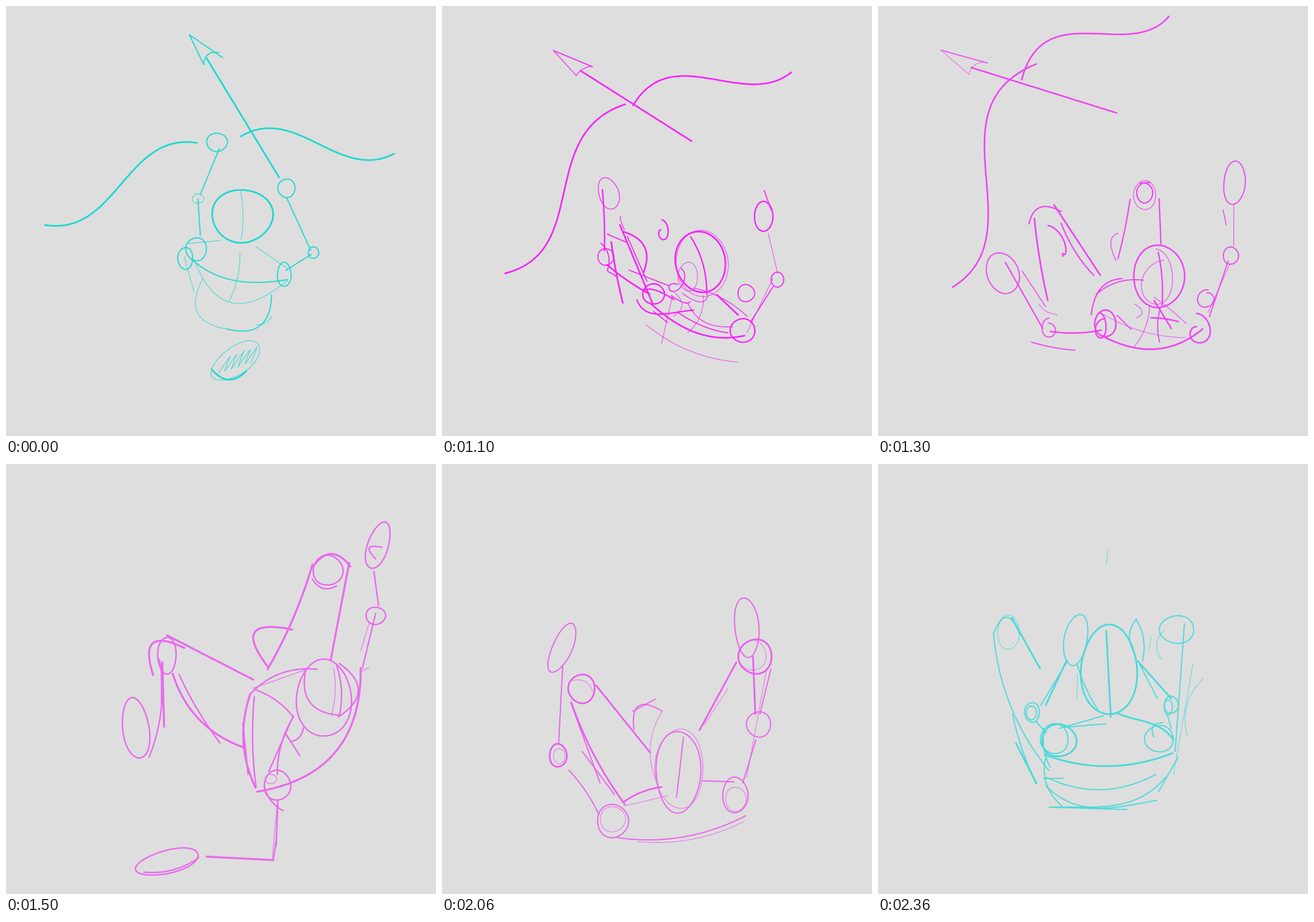
An HTML page for the animation above (2.86 s loop, 748 by 748 pixels).

```html
<!DOCTYPE html>
<html lang="en">
<head>
<meta charset="utf-8">
<title>Jump roughs</title>
<style>
html, body { margin: 0; width: 100%; height: 100%; overflow: hidden; background: #dedede; }
svg { display: block; width: 100vw; height: 100vh; }
path { fill: none; stroke-linecap: round; stroke-linejoin: round; }
</style>
</head>
<body>
<svg id="stage" viewBox="0 0 748 748"></svg>
<script>
const N = 48;
const mix = (a, b, t) => a + (b - a) * t;
const trace = f => ({ w: 1, pts: Array.from({ length: N + 1 }, (_, i) => f(i / N)) });

// Bowed line: p and q push its two handles to the right of the way it runs.
function arc(x1, y1, x2, y2, p = 0, q = p) {
  const dx = x2 - x1, dy = y2 - y1, len = Math.hypot(dx, dy);
  return trace(t => {
    const off = 3 * t * (1 - t) * ((1 - t) * p + t * q);
    return [x1 + dx * t - dy / len * off, y1 + dy * t + dx / len * off];
  });
}

function ring(cx, cy, rx, ry, tilt = 0) {
  const r = tilt * Math.PI / 180, c = Math.cos(r), s = Math.sin(r);
  return trace(t => {
    const a = (t - .25) * 2 * Math.PI, k = 1 + .025 * Math.sin(3 * a + cx);
    const x = rx * k * Math.cos(a), y = ry * k * Math.sin(a);
    return [cx + x * c - y * s, cy + x * s + y * c];
  });
}

function hatch(x1, y1, x2, y2, turns, h) {
  return trace(t => {
    const s = Math.asin(Math.cos(t * turns * 2 * Math.PI)) / Math.PI * 2 * h;
    return [mix(x1, x2, t) - s * .55, mix(y1, y2, t) + s];
  });
}

const fine = s => ({ ...s, w: .62 });
const bold = s => ({ ...s, w: 1.4 });
const groups = ["guide", "legL", "legR", "body", "armL", "armR", "head"];

class Pose {
  constructor(ink, weight) {
    this.ink = [1, 3, 5].map(i => parseInt(ink.slice(i, i + 2), 16));
    this.weight = weight;
    for (const g of groups) this[g] = [];
  }
  part(name, ...strokes) {
    this[name] = strokes.map(s => ({ ...s, w: s.w * this.weight }));
    return this;
  }
}

const stand = new Pose("#1ed8d0", 2.1)
  .part("guide", bold(arc(68, 381, 332, 238, 77, -76)), bold(arc(408, 227, 675, 257, -68, 60)),
    bold(arc(475, 298, 349, 91)), arc(377, 90, 319, 50), arc(319, 50, 344, 102), arc(344, 102, 370, 81, -12))
  .part("head", bold(ring(411, 365, 53, 46)), fine(arc(408, 322, 409, 406, -5)))
  .part("body", arc(322, 440, 490, 476, 33, 22), fine(arc(328, 443, 490, 477, 85, 70)),
    fine(arc(407, 430, 388, 514, -7)), fine(arc(342, 475, 385, 562, 45)), arc(385, 562, 462, 503, 40),
    fine(arc(436, 555, 463, 540, 5)), fine(arc(318, 413, 372, 408)), fine(arc(435, 419, 490, 457)))
  .part("armL", ring(367, 237, 18, 16), arc(371, 248, 338, 328), fine(ring(334, 335, 10, 8)),
    arc(334, 336, 338, 399), ring(331, 423, 18, 20))
  .part("armR", ring(488, 317, 15, 16), arc(488, 333, 530, 425), ring(535, 429, 9, 10),
    arc(531, 432, 487, 460), ring(484, 467, 12, 21))
  .part("legL", ring(312, 439, 13, 19), fine(arc(310, 436, 327, 497)))
  .part("legR", fine(ring(400, 617, 49, 24, -35)), bold(arc(358, 632, 418, 635, 22)),
    fine(hatch(376, 626, 435, 605, 5, 16)));

const dip = new Pose("#fb10fb", 2.1)
  .part("guide", bold(arc(90, 441, 362, 241, 103, -52)), bold(arc(415, 218, 709, 213, -80, 50)),
    bold(arc(453, 284, 320, 118)), arc(333, 112, 278, 78), arc(278, 78, 309, 123), arc(309, 123, 333, 112))
  .part("head", bold(ring(432, 399, 45, 58, -20)), arc(405, 350, 451, 453, -17),
    fine(ring(435, 397, 50, 61, -10)), fine(ring(426, 388, 38, 46)))
  .part("body", bold(arc(355, 463, 505, 516, 12, 32)), bold(arc(354, 462, 382, 522, 8)),
    fine(arc(446, 457, 415, 523, -11)), bold(arc(313, 488, 440, 541, 82, 30)),
    fine(arc(330, 528, 443, 540, 20)), arc(378, 436, 514, 490, -20), fine(arc(367, 478, 515, 516, 50, 30)))
  .part("armL", fine(ring(384, 263, 17, 15)), bold(arc(379, 272, 338, 333, -5)), ring(330, 348, 12, 10),
    bold(arc(331, 367, 362, 445)), ring(366, 452, 21, 13), ring(373, 453, 13, 13),
    arc(373, 241, 402, 219, -14), arc(402, 219, 398, 254, -14))
  .part("armR", bold(ring(508, 369, 13, 15)), fine(arc(523, 391, 559, 456)), ring(563, 461, 10, 11),
    arc(553, 473, 511, 498), ring(500, 505, 20, 15), ring(510, 369, 9, 10))
  .part("legL", arc(314, 411, 320, 452, 30), bold(arc(317, 443, 327, 503)))
  .part("legR", arc(402, 562, 390, 618, 18), arc(390, 618, 458, 562, 22), fine(arc(384, 610, 458, 565, 42)));

const tip = new Pose("#f03cf2", 2)
  .part("guide", bold(arc(130, 489, 275, 101, 107, -150)), bold(arc(250, 128, 506, 18, -120, 47)),
    bold(arc(415, 186, 162, 107)), arc(190, 99, 110, 77), fine(arc(110, 77, 158, 119)), fine(arc(158, 119, 188, 98, -10)))
  .part("head", bold(ring(467, 491, 43, 50)), bold(arc(460, 453, 470, 549, -4)), fine(ring(470, 499, 41, 55)))
  .part("body", bold(arc(374, 575, 547, 631, 36)), arc(350, 528, 424, 499, -28), fine(arc(463, 550, 440, 614, -12)),
    arc(365, 535, 435, 517, -10), bold(arc(488, 536, 552, 597, -4)), fine(arc(497, 545, 548, 590)),
    arc(488, 555, 496, 600, 4), arc(393, 562, 417, 581), fine(arc(430, 530, 428, 570, -18)),
    fine(arc(380, 585, 540, 650, 18)), bold(arc(503, 533, 540, 568)))
  .part("armL", ring(196, 389, 18, 42, -20), arc(179, 367, 227, 518), ring(240, 525, 16, 19),
    bold(arc(243, 533, 360, 557, 7)), bold(ring(370, 550, 17, 22)), arc(180, 385, 231, 500),
    fine(arc(262, 538, 220, 512)), bold(ring(363, 550, 15, 25)), arc(276, 543, 345, 570))
  .part("armR", ring(611, 363, 19, 37), fine(arc(612, 400, 609, 475)), ring(604, 491, 12, 15),
    arc(598, 505, 562, 602), bold(ring(546, 624, 23, 26)), ring(548, 630, 20, 20),
    fine(arc(605, 508, 560, 602)), arc(602, 388, 590, 355))
  .part("legL", arc(265, 383, 322, 370, -18), bold(arc(272, 378, 302, 530, 4)), bold(arc(315, 362, 372, 499)),
    bold(arc(322, 374, 356, 445, -28)), arc(328, 382, 362, 460))
  .part("legR", ring(430, 377, 24, 27), arc(407, 390, 405, 467), arc(453, 390, 468, 440),
    fine(arc(405, 410, 386, 494)), fine(ring(432, 377, 17, 25)));

const swing = new Pose("#e96bee", 2.5)
  .part("head", ring(553, 408, 48, 67), fine(arc(570, 356, 566, 438, -6)),
    arc(521, 360, 580, 437, 36), arc(580, 437, 575, 350, 8))
  .part("body", bold(arc(437, 570, 617, 355, 80)), bold(arc(434, 563, 425, 400, -22)), arc(500, 438, 457, 535),
    arc(425, 400, 541, 357, -20), arc(435, 562, 432, 405, -6), arc(432, 392, 500, 440, -8),
    arc(500, 440, 472, 540, 10), arc(485, 467, 511, 507), arc(495, 483, 517, 459, 8),
    fine(arc(430, 390, 521, 358)), arc(412, 450, 421, 540))
  .part("armL", ring(281, 692, 56, 20, -14), bold(arc(349, 683, 465, 689)), arc(465, 689, 470, 655),
    arc(470, 665, 473, 585), ring(472, 559, 23, 26), fine(arc(463, 690, 472, 590)),
    fine(ring(461, 548, 10, 8)), arc(449, 560, 482, 603, 8), arc(240, 710, 335, 685, 12))
  .part("armR", ring(647, 142, 18, 42, 18), arc(640, 187, 648, 246), ring(643, 264, 17, 15),
    arc(643, 260, 620, 355), arc(580, 347, 578, 440, -45), arc(643, 165, 654, 145, -25),
    fine(arc(632, 275, 617, 325)), fine(arc(618, 361, 631, 354)))
  .part("legL", bold(arc(256, 367, 310, 320, -56)), bold(arc(272, 345, 275, 457)), bold(arc(280, 298, 430, 375)),
    ring(226, 460, 23, 53, -8), bold(arc(290, 365, 416, 494, 30)), arc(301, 366, 372, 485, 5),
    ring(280, 333, 16, 32), arc(249, 510, 267, 340, 16), bold(arc(271, 350, 271, 415)))
  .part("legR", bold(arc(533, 180, 599, 178, -30)), bold(arc(533, 175, 455, 357, -8)), bold(arc(597, 172, 565, 340)),
    bold(arc(455, 352, 498, 288, -75, -62)), ring(560, 185, 26, 26), arc(533, 200, 575, 212, 14));

const crouch = new Pose("#f07cf6", 2.7)
  .part("head", bold(ring(397, 164, 35, 63)), arc(400, 104, 393, 220), arc(371, 158, 424, 167, 18))
  .part("body", arc(314, 237, 487, 237, 32), arc(302, 265, 400, 395, 30), fine(arc(402, 230, 407, 395)),
    arc(357, 376, 372, 480, 25), arc(372, 480, 443, 378, 60, 105), arc(400, 395, 495, 268, 26),
    bold(arc(340, 450, 472, 450, 42)), arc(314, 237, 370, 222), arc(416, 225, 487, 237),
    fine(arc(315, 248, 470, 245, 16)), arc(360, 385, 446, 388, 22), fine(arc(300, 278, 355, 371, 20)),
    fine(arc(355, 371, 470, 340, 12)))
  .part("armL", ring(121, 101, 28, 11), arc(133, 97, 192, 160), ring(201, 175, 14, 14),
    arc(205, 190, 272, 239, 8), bold(ring(293, 250, 18, 23)), fine(ring(295, 244, 14, 13)), arc(189, 175, 208, 179, -7))
  .part("armR", ring(648, 80, 27, 12), arc(621, 83, 570, 157, -7), ring(571, 166, 17, 14),
    arc(567, 170, 512, 228), bold(ring(490, 245, 23, 19)), arc(468, 240, 482, 274, 10), arc(475, 235, 478, 245, -14))
  .part("legL", ring(216, 270, 28, 30), bold(arc(188, 265, 245, 375)), bold(arc(190, 255, 357, 375, -65, -20)),
    bold(arc(220, 344, 305, 425, 60, 30)), bold(arc(231, 342, 335, 448)), fine(arc(240, 295, 316, 362)),
    bold(arc(258, 410, 300, 424)))
  .part("legR", ring(576, 271, 26, 28), bold(arc(562, 246, 448, 360, -12)), bold(arc(562, 246, 485, 440, -95, -25)),
    bold(arc(567, 352, 498, 433, -42)), fine(arc(550, 325, 468, 401)), fine(arc(530, 300, 463, 361, -8)),
    bold(arc(562, 352, 520, 402)), arc(498, 433, 527, 428, -18), arc(485, 440, 450, 474));

const land = new Pose("#ea5fee", 2.1)
  .part("head", ring(411, 535, 39, 71), arc(420, 475, 408, 580), fine(ring(413, 530, 42, 69)))
  .part("body", arc(305, 650, 528, 612, 24), bold(arc(316, 588, 382, 562, -6)), fine(arc(316, 595, 393, 577)),
    fine(arc(340, 657, 525, 622, 18)), arc(453, 551, 508, 553))
  .part("armL", ring(209, 320, 17, 46, 24), arc(210, 350, 203, 485), bold(ring(202, 507, 15, 20)),
    arc(221, 533, 273, 610, -5), ring(297, 621, 27, 29), fine(ring(204, 508, 10, 13)), fine(ring(297, 618, 22, 22)))
  .part("armR", ring(530, 284, 21, 52, -5), arc(572, 357, 553, 435), ring(551, 453, 21, 22),
    arc(546, 480, 523, 555), ring(510, 576, 22, 31), fine(ring(511, 583, 18, 21)), fine(arc(565, 355, 530, 545)))
  .part("legL", bold(ring(243, 391, 23, 25)), arc(224, 415, 275, 555), bold(arc(268, 385, 362, 502)),
    arc(334, 462, 383, 430, -40), bold(arc(225, 415, 318, 592, 10)), fine(arc(226, 377, 262, 395, -12)),
    arc(244, 500, 300, 575), arc(332, 430, 371, 409), fine(arc(383, 430, 372, 550, 20)))
  .part("legR", bold(ring(545, 335, 29, 30)), bold(arc(512, 345, 448, 463)), bold(arc(541, 335, 545, 435)),
    fine(arc(498, 390, 455, 455)), fine(ring(540, 333, 24, 26)));

const rest = new Pose("#49d9db", 2.1)
  .part("head", bold(ring(402, 359, 49, 78)), bold(arc(397, 290, 405, 440)), arc(347, 350, 382, 427, 4),
    fine(arc(400, 150, 397, 175)))
  .part("body", bold(arc(290, 506, 512, 503, 28)), arc(315, 460, 392, 438), arc(324, 458, 396, 452),
    arc(293, 545, 483, 540, 32), arc(298, 597, 500, 545, 15, 50), arc(292, 560, 485, 585, 50, 20),
    arc(298, 597, 433, 601), bold(arc(415, 433, 514, 480, 0, -22)), arc(295, 500, 320, 595, 22), arc(289, 547, 322, 547))
  .part("armL", ring(344, 306, 20, 45, 10), bold(arc(328, 342, 292, 419)), ring(268, 432, 13, 17),
    arc(275, 448, 293, 468), bold(ring(315, 481, 30, 28)), ring(267, 433, 9, 12),
    arc(330, 342, 283, 420), ring(307, 478, 24, 26), arc(289, 460, 300, 528, 8))
  .part("armR", arc(449, 270, 460, 343, -10), bold(arc(452, 343, 510, 408)), ring(510, 419, 12, 15),
    arc(503, 435, 510, 460), ring(489, 478, 25, 23), ring(505, 423, 7, 13), arc(455, 348, 486, 408),
    arc(449, 270, 447, 330, 14), arc(480, 475, 495, 450, -14))
  .part("legL", fine(ring(227, 293, 19, 30)), arc(201, 295, 297, 533, 26), bold(arc(233, 268, 282, 356)),
    fine(arc(347, 365, 346, 408)), arc(234, 435, 275, 556, 5), arc(201, 295, 246, 295, -38), bold(arc(240, 486, 276, 556)))
  .part("legR", ring(520, 288, 30, 24), fine(arc(497, 290, 493, 340, 14)), arc(533, 278, 517, 500),
    fine(arc(475, 300, 471, 325)), fine(arc(548, 347, 514, 540)), fine(arc(566, 373, 538, 473, 20)),
    arc(522, 510, 488, 570));

// start time, pose, next pose, share of the way
const steps = [
  [0, stand], [1000, dip], [1050, dip, tip, .25], [1100, dip, tip, .5], [1150, dip, tip, .75],
  [1200, tip], [1250, tip, swing, .25], [1330, tip, swing, .5], [1420, tip, swing, .75],
  [1500, swing], [1580, swing, crouch, .5], [1660, crouch],
  [2060, land], [2160, land, rest, .33], [2260, land, rest, .67], [2360, rest]
];
const LOOP = 2860;

function centre(strokes) {
  const all = strokes.flatMap(s => s.pts);
  return [0, 1].map(j => all.reduce((sum, p) => sum + p[j], 0) / all.length);
}

const shift = (s, d, k) => ({ w: s.w, pts: s.pts.map(p => [p[0] + d[0] * k, p[1] + d[1] * k]) });

// Pairs morph; spare strokes ride along with their limb.
function between(a, b, t) {
  const n = Math.min(a.length, b.length);
  const pairs = a.slice(0, n).map((s, i) => ({
    w: mix(s.w, b[i].w, t),
    pts: s.pts.map((p, k) => p.map((v, j) => mix(v, b[i].pts[k][j], t)))
  }));
  let d = [0, 0];
  if (n) {
    const from = centre(a), to = centre(b);
    d = [to[0] - from[0], to[1] - from[1]];
  }
  const spare = t < .5 ? a.slice(n).map(s => shift(s, d, t)) : b.slice(n).map(s => shift(s, d, t - 1));
  return pairs.concat(spare);
}

function draw([, a, b = a, t = 0]) {
  const ink = a.ink.map((c, i) => Math.round(mix(c, b.ink[i], t)));
  const paths = groups.flatMap(g => b === a ? a[g] : between(a[g], b[g], t)).map(s => {
    const d = "M" + s.pts.map(p => p[0].toFixed(1) + " " + p[1].toFixed(1)).join("L");
    const alpha = Math.min(1, .42 + .24 * s.w).toFixed(2);
    return `<path d="${d}" stroke-width="${s.w.toFixed(2)}" stroke-opacity="${alpha}"/>`;
  });
  return `<rect width="748" height="748" fill="#dedede"/><g stroke="rgb(${ink})">${paths.join("")}</g>`;
}

const stage = document.getElementById("stage");
const start = performance.now();
let shown = null;

function tick() {
  const t = (performance.now() - start) % LOOP;
  const step = steps.filter(s => s[0] <= t).pop();
  if (step !== shown) stage.innerHTML = draw(shown = step);
  requestAnimationFrame(tick);
}
tick();
</script>
</body>
</html>
```
